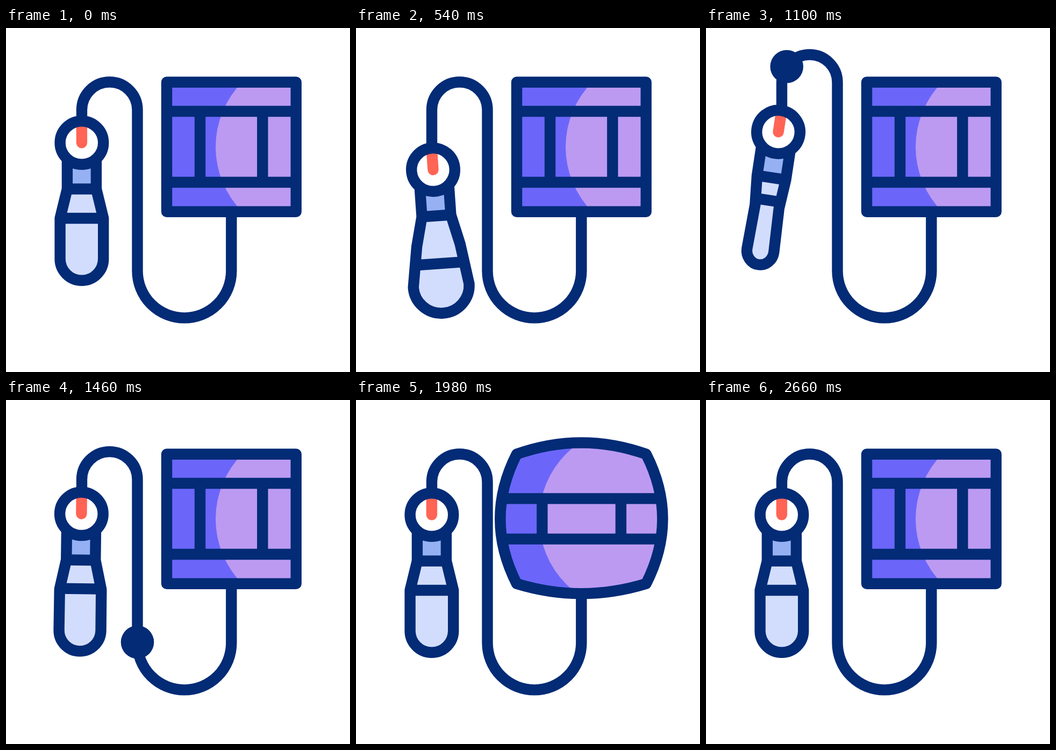
Recreate the animation shown at these times as an HTML page with a canvas. Size 640x640 px, loop 3.6 s.

```html
<!DOCTYPE html>
<html>
<head>
<meta charset="utf-8">
<style>
  html, body { margin: 0; width: 100%; height: 100%; overflow: hidden; background: #fff; }
  canvas { display: block; }
</style>
</head>
<body>
<canvas id="stage" width="640" height="640"></canvas>
<script>
const ctx = document.getElementById('stage').getContext('2d');
const NAVY = '#032b76', INDIGO = '#6b66f9', LILAC = '#bc9af2';
const PALE = '#d2ddfd', SKY = '#95b1f3', RED = '#ff6454';
const LOOP = 3600, PI = Math.PI;

// Pump poses: dx, dy, degrees, shoulder half-width, base half-width, base y, bottom y, band y, hose shift
const REST = [0, 0, 0, 40.3, 40.3, 216, 256.2, 140.5, 0];
const FULL = [2.6, 50.2, -4, 40.3, 52, 216, 267.5, 175, 0];
const SQUEEZED = [-6.4, -20.7, 8.7, 22.3, 25, 223, 249.5, 128, -51.5];
const PUMP = [[110, REST], [545, FULL], [1133, SQUEEZED], [1533, REST]];
const CUFF = [[1733, [0]], [1867, [1]], [2667, [0]]];
// Air ball: time, distance left to the cuff, speed
const BALL = [[850, 950, 0], [1100, 857, -.45], [1200, 803, -.8], [1460, 378, -1.85], [1733, -40, -.9]];

const HOSE = { left: 141, mid: 244.5, right: 419.3, top: 152.3, low: 452, end: 352 };
const R1 = (HOSE.mid - HOSE.left) / 2, R2 = (HOSE.right - HOSE.mid) / 2;

function tween(keys, t) {
  if (t <= keys[0][0]) return keys[0][1];
  for (let i = 1; i < keys.length; i++) {
    const [t0, a] = keys[i - 1], [t1, b] = keys[i];
    if (t < t1) {
      const x = (t - t0) / (t1 - t0), e = x * x * (3 - 2 * x);
      return a.map((v, k) => v + (b[k] - v) * e);
    }
  }
  return keys[keys.length - 1][1];
}

function hermite(keys, t) {
  const i = keys.findIndex(k => t < k[0]);
  if (i < 1) return null;
  const [t0, a, va] = keys[i - 1], [t1, b, vb] = keys[i];
  const d = t1 - t0, x = (t - t0) / d, y = 1 - x;
  return a * y * y * (1 + 2 * x) + b * x * x * (3 - 2 * x) + d * x * y * (va * y - vb * x);
}

function line(x0, y0, x1, y1, color = NAVY, cap = 'butt') {
  ctx.beginPath();
  ctx.moveTo(x0, y0);
  ctx.lineTo(x1, y1);
  ctx.lineCap = cap;
  ctx.strokeStyle = color;
  ctx.stroke();
}

function disc(x, y, r, color) {
  ctx.beginPath();
  ctx.arc(x, y, r, 0, 2 * PI);
  ctx.fillStyle = color;
  ctx.fill();
}

function inside(path, draw) {
  ctx.save();
  ctx.clip(path);
  draw();
  ctx.restore();
}

function outline(path) {
  ctx.strokeStyle = NAVY;
  ctx.stroke(path);
}

// Point on the hose, measured back from the cuff
function hosePoint(d, shift) {
  const { left, mid, right, low, end } = HOSE, top = HOSE.top + shift;
  if (d < low - end) return [right, end + d];
  d -= low - end;
  if (d < PI * R2) return [mid + R2 + R2 * Math.cos(d / R2), low + R2 * Math.sin(d / R2)];
  d -= PI * R2;
  if (d < low - top) return [mid, low - d];
  d -= low - top;
  if (d < PI * R1) return [left + R1 + R1 * Math.cos(d / R1), top - R1 * Math.sin(d / R1)];
  return [left, top + d - PI * R1];
}

function drawHose(startY, shift) {
  const { left, mid, right, top, low, end } = HOSE;
  ctx.beginPath();
  ctx.moveTo(left, startY);
  ctx.arc(left + R1, top + shift, R1, PI, 0);
  ctx.arc(mid + R2, low, R2, PI, 0, true);
  ctx.lineTo(right, end - 10);
  ctx.lineCap = 'butt';
  ctx.strokeStyle = NAVY;
  ctx.stroke();
}

function drawPump([dx, dy, deg, shoulder, base, baseY, bottom, band]) {
  ctx.save();
  ctx.translate(140.9 + dx, 213.5 + dy);
  ctx.rotate(deg * PI / 180);

  const body = new Path2D();
  const k = .552, dip = baseY + (bottom - baseY) * k;
  body.moveTo(-27, 25);
  body.lineTo(-27, 86);
  body.lineTo(-shoulder, 140.5);
  body.lineTo(-base, baseY);
  body.bezierCurveTo(-base, dip, -base * k, bottom, 0, bottom);
  body.bezierCurveTo(base * k, bottom, base, dip, base, baseY);
  body.lineTo(shoulder, 140.5);
  body.lineTo(27, 86);
  body.lineTo(27, 25);
  inside(body, () => {
    ctx.fillStyle = PALE;
    ctx.fillRect(-60, 80, 120, 200);
    ctx.fillStyle = SKY;
    ctx.fillRect(-60, 20, 120, 66);
    line(-60, 86, 60, 86);
    line(-60, band, 60, band);
  });
  outline(body);

  disc(0, 0, 40, '#fff');
  line(0, -40, 0, 0, RED, 'round');
  ctx.beginPath();
  ctx.arc(0, 0, 40.3, 0, 2 * PI);
  ctx.strokeStyle = NAVY;
  ctx.stroke();
  ctx.restore();
}

function drawCuff(p) {
  const l = 299, r = 539.7, t = 100.7, b = 341.8, cx = (l + r) / 2, cy = (t + b) / 2;
  const shape = new Path2D();
  shape.moveTo(l, t);
  shape.quadraticCurveTo(cx, t - 45 * p, r, t);
  shape.quadraticCurveTo(r + 65 * p, cy, r, b);
  shape.quadraticCurveTo(cx, b + 39 * p, l, b);
  shape.quadraticCurveTo(l - 65 * p, cy, l, t);
  shape.closePath();
  inside(shape, () => {
    ctx.fillStyle = INDIGO;
    ctx.fillRect(240, 50, 360, 340);
    // The lilac area runs to the right edge beyond the curved boundary
    disc(562 - 52 * p, cy, 172, LILAC);
    ctx.fillRect(500, 50, 100, 340);
    const y0 = 155 + 30 * p, y1 = 287 - 30 * p;
    line(240, y0, 600, y0);
    line(240, y1, 600, y1);
    line(361 - 15.5 * p, y0, 361 - 15.5 * p, y1);
    line(477.3 + 16.5 * p, y0, 477.3 + 16.5 * p, y1);
  });
  outline(shape);
}

function frame() {
  const t = performance.now() % LOOP;
  const pose = tween(PUMP, t), shift = pose[8];
  ctx.fillStyle = '#fff';
  ctx.fillRect(0, 0, 640, 640);
  ctx.lineWidth = 20.4;
  ctx.lineJoin = 'round';
  drawHose(213 + pose[1], shift);
  const left = hermite(BALL, t);
  if (left !== null) disc(...hosePoint(left, shift), 30.8, NAVY);
  drawPump(pose);
  drawCuff(tween(CUFF, t)[0]);
  requestAnimationFrame(frame);
}
frame();
</script>
</body>
</html>
```
